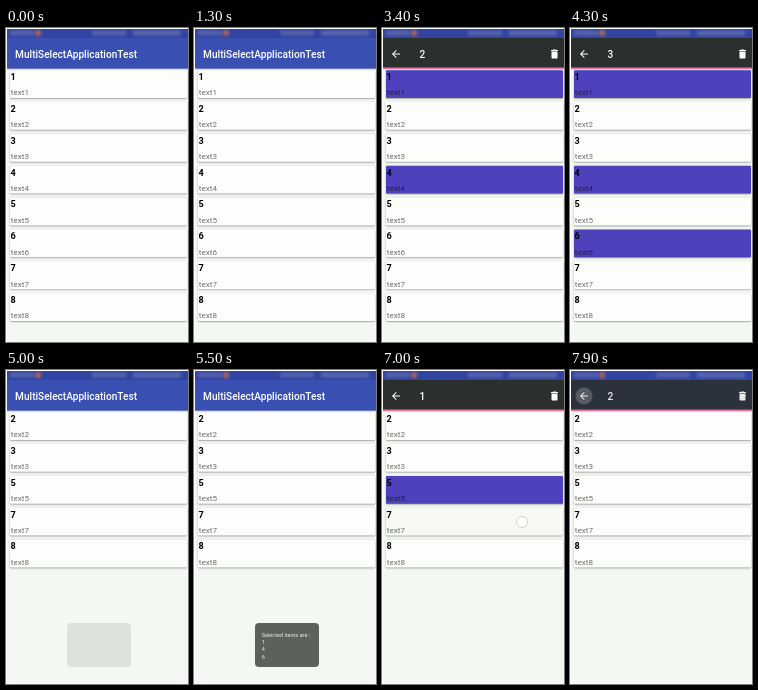
These frames come from a looping animation (182 px wide and 314 px high, 8 s). An HTML page with a canvas:

```html
<!DOCTYPE html>
<html lang="en">
<head>
<meta charset="utf-8">
<title>Multi-select list</title>
<style>
  html, body { margin: 0; width: 100%; height: 100%; overflow: hidden; background: #f3f8f2; }
  canvas { display: block; width: 182px; height: 314px; }
</style>
</head>
<body>
<canvas></canvas>
<script>
const W = 182, H = 314, LOOP = 8000;
const DELETE_AT = 4800;
const canvas = document.querySelector('canvas');
const g = canvas.getContext('2d');
const dpr = window.devicePixelRatio || 1;
canvas.width = W * dpr;
canvas.height = H * dpr;

const ARROW = new Path2D('M20 11H7.83l5.59-5.59L12 4l-8 8 8 8 1.41-1.41L7.83 13H20z');
const TRASH = new Path2D('M6 19c0 1.1.9 2 2 2h8c1.1 0 2-.9 2-2V7H6zM19 4h-3.5l-1-1h-5l-1 1H5v2h14z');

const selections = [
  { id: 1, from: 2700, to: DELETE_AT },
  { id: 4, from: 3300, to: DELETE_AT },
  { id: 6, from: 3800, to: DELETE_AT },
  { id: 5, from: 6800, to: 7850 },
  { id: 7, from: 7050, to: 7850 }
];
const touches = [
  { x: 125, y: 62.5, from: 2150, to: 2880, id: 1 },
  { x: 122, y: 152, from: 3220, to: 3350, id: 4 },
  { x: 122, y: 207, from: 3600, to: 3830, id: 6 },
  { x: 172, y: 26, from: 4600, to: 4780, icon: true },
  { x: 144, y: 112, from: 6380, to: 6880, id: 5 },
  { x: 140, y: 152, from: 6960, to: 7090, id: 7 },
  { x: 14, y: 26, from: 7650, to: 7850, icon: true }
];
// Contextual action bar: visible spans
const modes = [{ from: 2700, to: DELETE_AT }, { from: 6800, to: 7880 }];

const clamp = v => Math.max(0, Math.min(1, v));
const ramp = (t, start, length) => clamp((t - start) / length);
const fade = (t, span, rise, fall) => ramp(t, span.from, rise) * (1 - ramp(t, span.to, fall));
const active = (t, span) => t >= span.from && t < span.to;
const modeAlpha = (t, mode) => fade(t, mode, 200, 200);

function rect(x, y, w, h, color, r = 0) {
  g.fillStyle = color;
  g.beginPath();
  g.roundRect(x, y, w, h, r);
  g.fill();
}

function circle(x, y, r, color) {
  g.fillStyle = color;
  g.beginPath();
  g.arc(x, y, r, 0, 7);
  g.fill();
}

function text(str, x, y, size, color, weight = 400) {
  g.font = `${weight} ${size}px Roboto, sans-serif`;
  g.fillStyle = color;
  g.fillText(str, x, y);
}

function icon(path, x, y) {
  g.save();
  g.translate(x - 6, y - 6);
  g.scale(0.5, 0.5);
  g.fillStyle = '#fff';
  g.fill(path);
  g.restore();
}

function withAlpha(alpha, paint) {
  if (alpha <= 0) return;
  g.save();
  g.globalAlpha = alpha;
  paint();
  g.restore();
}

function drawStatusBar() {
  g.save();
  g.beginPath();
  g.rect(1, 1, W - 1, 9);
  g.clip();
  rect(1, 1, W - 1, 9, '#3144a2');
  g.filter = 'blur(1.5px)';
  rect(4, 2.5, 24, 5, '#5663ac');
  circle(32, 5, 3.2, '#a5655f');
  rect(86, 2.5, 34, 5, '#5562ab');
  rect(127, 2.5, 48, 5, '#5a67ae');
  g.restore();
}

function drawCard(id, index, t) {
  const y = 42.2 + index * 31.86;
  const selected = selections.some(s => s.id === id && active(t, s));
  g.save();
  g.shadowColor = 'rgba(0,0,0,.4)';
  g.shadowBlur = 1.6 * dpr;
  g.shadowOffsetY = 0.7 * dpr;
  rect(4, y, 177, 27.8, selected ? '#4d42bc' : '#fcfefb', 1);
  g.restore();
  if (!selected) {
    for (const touch of touches.filter(p => p.id === id)) {
      withAlpha(fade(t, touch, 90, 100), () => rect(4, y, 177, 27.8, '#edf1ea', 1));
    }
  }
  text(id, 4.6, y + 9.8, 9.1, '#000', 700);
  text('text' + id, 4.8, y + 25.2, 8.1, 'rgba(0,0,0,.56)');
}

function drawAppBar(t) {
  const edge = g.createLinearGradient(0, 40, 0, 42);
  edge.addColorStop(0, 'rgba(70,85,150,.6)');
  edge.addColorStop(1, 'rgba(70,85,150,0)');
  rect(1, 40, W - 1, 2, edge);
  rect(1, 10, W - 1, 30.4, '#3950b2');
  if (!modes.some(mode => modeAlpha(t, mode) > 0)) {
    text('MultiSelectApplicationTest', 9.1, 29.7, 10.1, '#fff', 500);
  }
}

function drawActionBar(t) {
  for (const mode of modes) {
    withAlpha(modeAlpha(t, mode), () => {
      rect(1, 10, W - 1, 30, '#2b302e');
      rect(1, 39.6, W - 1, 1.3, '#f0709c');
      for (const touch of touches.filter(p => p.icon)) {
        withAlpha(fade(t, touch, 80, 250) * 0.25, () => circle(touch.x, touch.y, 8.5, '#fff'));
      }
      // The count stays put while the bar fades away
      const count = selections.filter(s => s.from >= mode.from && s.to <= mode.to && t >= s.from).length;
      icon(ARROW, 14, 26);
      text(count, 37.5, 29.7, 10.1, '#fff', 500);
      icon(TRASH, 172.5, 26);
    });
  }
}

function drawToast(t) {
  withAlpha(fade(t, { from: 4950, to: 6350 }, 350, 110), () => {
    rect(61, 253, 64, 44, '#5b615b', 4);
    ['Selected items are :', '1', '4', '6'].forEach((line, i) =>
      text(line, 67.7, 267 + i * 7.2, 5.55, '#f0f2ef'));
  });
}

function drawTouches(t) {
  for (const touch of touches.filter(p => active(t, p))) {
    circle(touch.x, touch.y, 5.6, 'rgba(255,255,255,.5)');
    g.lineWidth = 0.8;
    g.strokeStyle = 'rgba(130,138,135,.4)';
    g.stroke();
    circle(touch.x, touch.y, 3.8, 'rgba(255,255,255,.5)');
  }
}

function draw(t) {
  g.setTransform(dpr, 0, 0, dpr, 0, 0);
  rect(0, 0, W, H, '#fdfefd');
  rect(1, 1, W - 1, H - 1, '#f3f8f2');
  const ids = [1, 2, 3, 4, 5, 6, 7, 8].filter(id => t < DELETE_AT || ![1, 4, 6].includes(id));
  ids.forEach((id, index) => drawCard(id, index, t));
  drawAppBar(t);
  drawStatusBar();
  drawActionBar(t);
  drawToast(t);
  drawTouches(t);
}

const start = performance.now();
function tick() {
  draw((performance.now() - start) % LOOP);
  requestAnimationFrame(tick);
}
tick();
</script>
</body>
</html>
```
